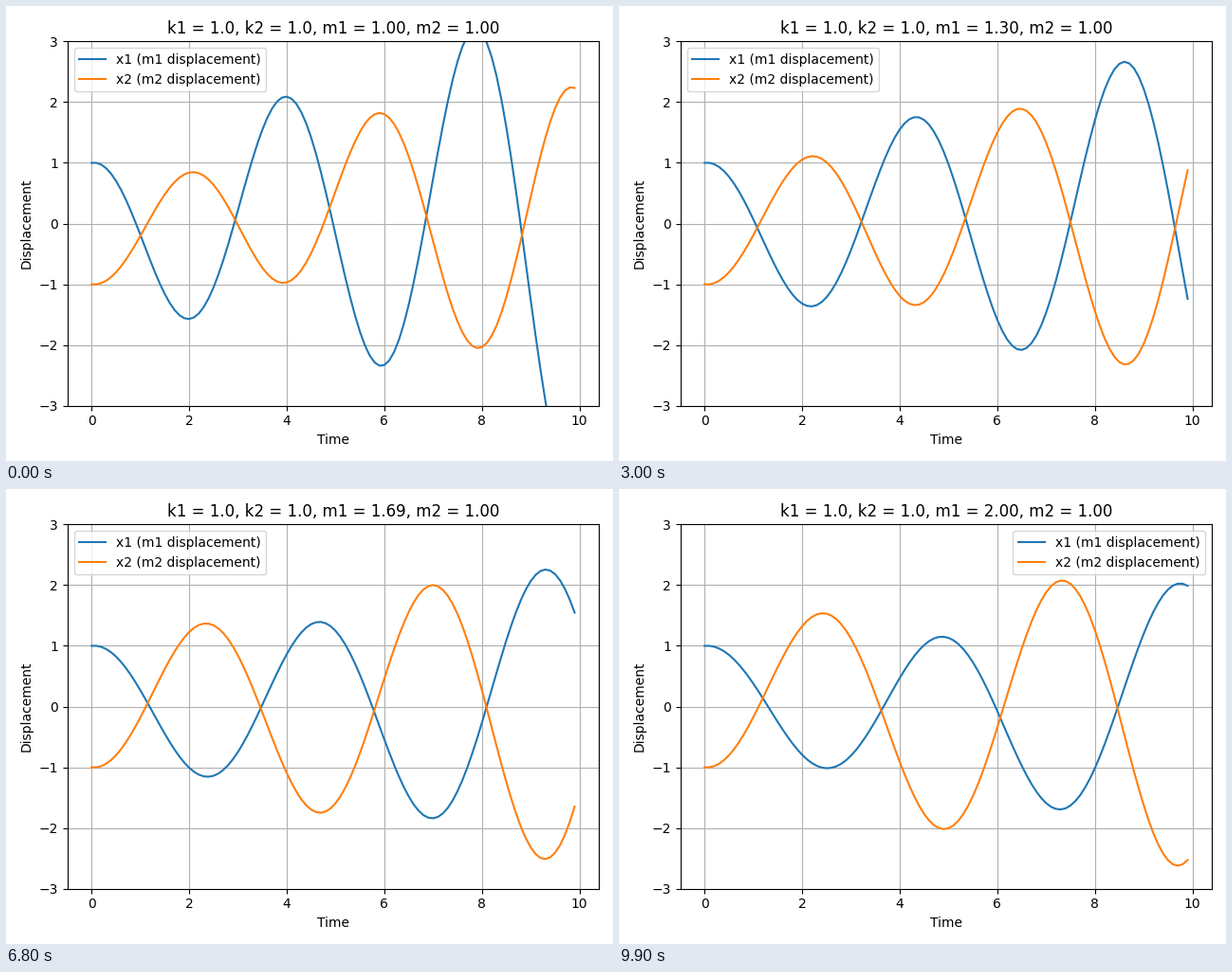
A matplotlib script that plays this animation: 640x480 px, repeating every 10 s.

```python
import numpy as np
import matplotlib.pyplot as plt
from matplotlib.animation import FuncAnimation

K1, K2, M2 = 1.0, 1.0, 1.0
DT, STEPS, FRAMES = 0.1, 100, 100
masses = np.linspace(1.0, 2.0, FRAMES)
t = np.arange(STEPS) * DT


def simulate(m1):
    """Two masses in series on springs, integrated with explicit Euler."""
    x = np.zeros((STEPS, 2))
    x[0] = 1.0, -1.0
    v = np.zeros(2)
    for i in range(1, STEPS):
        x1, x2 = x[i - 1]
        pull = K2 * (x2 - x1)
        acc = np.array([(pull - K1 * x1) / m1, -pull / M2])
        x[i] = x[i - 1] + v * DT
        v = v + acc * DT
    return x.T


fig, ax = plt.subplots(figsize=(6.4, 4.8), dpi=100)
lines = [ax.plot(t, x, label=f"x{n} (m{n} displacement)")[0]
         for n, x in enumerate(simulate(masses[0]), 1)]
ax.set_ylim(-3, 3)
ax.set_xlabel("Time")
ax.set_ylabel("Displacement")
ax.grid(True)
ax.legend(loc="best")


def update(frame):
    m1 = masses[frame]
    for line, x in zip(lines, simulate(m1)):
        line.set_ydata(x)
    ax.set_title(f"k1 = {K1:.1f}, k2 = {K2:.1f}, m1 = {m1:.2f}, m2 = {M2:.2f}")
    return lines


update(0)
fig.tight_layout()
anim = FuncAnimation(fig, update, frames=FRAMES, interval=100,
                     repeat=True, repeat_delay=0, blit=False)
plt.show()
```
